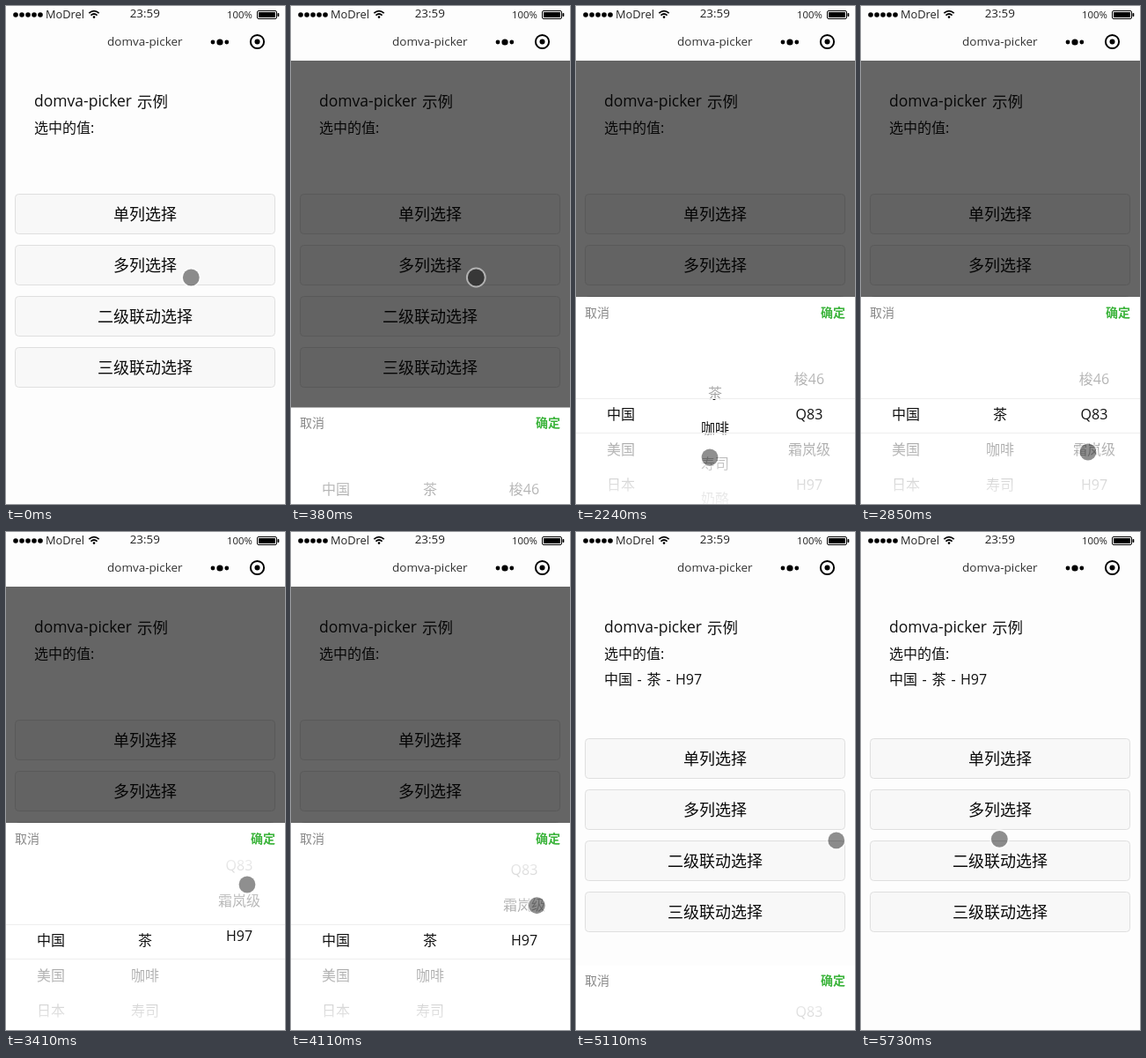
Recreate the animation shown at these times as an HTML page. Size 317 px wide and 565 px high, loop 5.8 s.

```html
<!DOCTYPE html>
<html lang="zh-CN">
<head>
<meta charset="utf-8">
<title>Picker</title>
<style>
  html, body { margin: 0; width: 100%; height: 100%; overflow: hidden; background: #fdfdfd; }
  svg { display: block; width: 317px; height: 565px; }
  text { font: 16px "Open Sans", "Noto Sans CJK SC", "Noto Sans CJK", sans-serif; }
  .mid { text-anchor: middle; }
  .end { text-anchor: end; }
</style>
</head>
<body>
<svg viewBox="0 0 317 565">
  <defs>
    <linearGradient id="fadeTop" x2="0" y2="1">
      <stop stop-color="#fff" stop-opacity=".95"/>
      <stop offset="1" stop-color="#fff" stop-opacity=".6"/>
    </linearGradient>
    <linearGradient id="fadeBottom" x2="0" y2="1">
      <stop stop-color="#fff" stop-opacity=".6"/>
      <stop offset="1" stop-color="#fff" stop-opacity=".95"/>
    </linearGradient>
    <clipPath id="wheel"><rect y="365" width="317" height="200"/></clipPath>
  </defs>

  <rect width="317" height="565" fill="#fdfdfd"/>

  <!-- Status bar -->
  <g id="signal"></g>
  <g fill="#222">
    <text x="45" y="13.5" style="font-size:12.8px">MoDrel</text>
    <text class="mid" x="157.8" y="13.3" style="font-size:13.4px">23:59</text>
    <text class="end" x="280" y="14" style="font-size:11.4px">100%</text>
  </g>
  <g fill="none" stroke="#000" stroke-width="1.7">
    <path d="M94.3 8.2Q100 3.2 105.7 8.2M96.4 10.6Q100 7.4 103.6 10.6"/>
    <circle cx="100" cy="12.6" r="1.3" fill="#000" stroke="none"/>
  </g>
  <rect x="285.5" y="5.5" width="22" height="9" rx="1.5" fill="none" stroke="#000"/>
  <rect x="287" y="7" width="19" height="6"/>
  <rect x="308.5" y="8" width="1.8" height="4" rx=".8"/>

  <!-- Navigation bar -->
  <text class="mid" x="157.8" y="45" fill="#333" style="font-size:13.5px">domva-picker</text>
  <circle cx="235" cy="41" r="2.4"/>
  <circle cx="243" cy="41" r="3.6"/>
  <circle cx="250.8" cy="41" r="2.4"/>
  <circle cx="285.5" cy="40.5" r="7.6" fill="none" stroke="#000" stroke-width="2"/>
  <circle cx="285.5" cy="40.5" r="3"/>

  <!-- Page -->
  <g fill="#111">
    <text x="32" y="114" style="font-size:17.5px">domva-picker</text>
    <text x="149" y="114.5" style="font-size:17.5px">示例</text>
    <text x="32" y="143.5">选中的值:</text>
    <text id="result" y="172.5"><tspan x="32">中国</tspan><tspan x="69.5">-</tspan><tspan x="80.5">茶</tspan><tspan x="102.5">-</tspan><tspan x="113">H97</tspan></text>
  </g>
  <g id="buttons" fill="#0a0a0a"></g>

  <rect id="mask" y="62" width="317" height="503" fill-opacity=".6"/>

  <!-- Picker panel -->
  <g id="panel">
    <rect y="330" width="317" height="235" fill="#fff"/>
    <text x="10" y="352.5" fill="#888" style="font-size:14px">取消</text>
    <text class="end" x="306" y="352.5" fill="#3cb43c" style="font-size:14px;font-weight:700">确定</text>
    <g id="columns" fill="#111" clip-path="url(#wheel)"></g>
    <rect y="365" width="317" height="80" fill="url(#fadeTop)"/>
    <rect y="485" width="317" height="80" fill="url(#fadeBottom)"/>
    <path d="M0 445.5H317M0 484.5H317" stroke="#eee"/>
  </g>

  <g id="pointer">
    <circle r="10.4" fill="none" stroke="#fff" stroke-opacity=".5" stroke-width="2"/>
    <circle id="touch" r="9.4"/>
  </g>
</svg>
<script>
const LOOP = 5800;
const PRESSED_AT = 230, OPEN_AT = 380, CONFIRM_AT = 4980, CLOSE_AT = 5040;
const $ = id => document.getElementById(id);

function add(parent, tag, attrs, text = '') {
  const node = document.createElementNS('http://www.w3.org/2000/svg', tag);
  for (const name in attrs) node.setAttribute(name, attrs[name]);
  node.textContent = text;
  return parent.appendChild(node);
}

for (let i = 0; i < 5; i++) add($('signal'), 'circle', { cx: 11 + i * 7, cy: 10, r: 2.8 });

const buttons = ['单列选择', '多列选择', '二级联动选择', '三级联动选择'].map((label, i) => {
  const y = 213 + i * 58;
  const box = add($('buttons'), 'rect', {
    x: 10.5, y: y + .5, width: 295, height: 45, rx: 4, fill: '#f8f8f8', stroke: '#dfdfdf'
  });
  const text = add($('buttons'), 'text', { class: 'mid', x: 158, y: y + 30.3, style: 'font-size:18px' }, label);
  return { box, text };
});

// Each wheel: centre x, rows, and keys of [time, selected row]
const wheels = [
  { x: 51, rows: ['中国', '美国', '日本', '俄罗斯'], keys: [[1170, 1], [1400, .1], [1560, 0]] },
  { x: 158, rows: ['茶', '咖啡', '寿司', '奶酪'], keys: [[2130, 1], [2240, .6], [2400, .05], [2600, 0]] },
  { x: 265, rows: ['梭46', 'Q83', '霜岚级', 'H97'], keys: [[2860, 1], [3150, 2.1], [3410, 3.12], [3640, 3]] }
];
for (const wheel of wheels) {
  wheel.node = add($('columns'), 'g', {});
  wheel.rows.forEach((row, i) =>
    add(wheel.node, 'text', { class: 'mid', x: wheel.x, y: 468.5 + i * 40 }, row));
}

// Pointer keys: [time, x, y]
const path = [
  [380, 210.3, 308], [930, 55.5, 464.5], [1160, 55.5, 464.5], [1500, 46, 509], [1620, 46, 509],
  [2020, 162, 464], [2120, 160, 466], [2240, 152, 512], [2400, 152, 516], [2710, 256, 508],
  [2860, 258, 506], [3410, 274, 400], [3500, 275, 404], [3760, 285, 545], [3960, 262, 493],
  [4030, 262, 493], [4190, 296, 357], [4480, 296, 357], [4570, 296, 350], [5100, 296, 350],
  [5560, 154, 319], [5730, 157.3, 348.3]
];

function follow(keys, t) {
  const next = keys.findIndex(key => key[0] > t);
  if (next === 0) return keys[0].slice(1);
  if (next < 0) return keys[keys.length - 1].slice(1);
  const a = keys[next - 1], b = keys[next];
  const p = (t - a[0]) / (b[0] - a[0]);
  const eased = p * p * (3 - 2 * p);
  return a.slice(1).map((v, i) => v + (b[i + 1] - v) * eased);
}

// CSS "ease": cubic-bezier(.25, .1, .25, 1)
function ease(p) {
  if (p <= 0) return 0;
  if (p >= 1) return 1;
  const bezier = (s, a, b) => 3 * s * (1 - s) ** 2 * a + 3 * s * s * (1 - s) * b + s ** 3;
  let lo = 0, hi = 1;
  for (let i = 0; i < 20; i++) {
    const s = (lo + hi) / 2;
    if (bezier(s, .25, .25) < p) lo = s; else hi = s;
  }
  return bezier(lo, .1, 1);
}

const show = (id, on) => $(id).setAttribute('visibility', on ? 'visible' : 'hidden');
const move = (node, x, y) => node.setAttribute('transform', `translate(${x} ${y})`);
const within = (t, from, to) => t >= from && t < to;

function draw(t) {
  const confirmed = t >= CONFIRM_AT;
  show('result', confirmed);
  move($('buttons'), 0, confirmed ? 21 : 0);

  const active = within(t, PRESSED_AT, OPEN_AT);
  buttons[1].box.setAttribute('fill', active ? '#dedede' : '#f8f8f8');
  buttons[1].text.setAttribute('fill-opacity', active ? .6 : 1);

  show('mask', within(t, OPEN_AT, CLOSE_AT));
  show('panel', t >= OPEN_AT);
  const raised = ease((t - 298) / 300) - ease((t - 4990) / 300);
  move($('panel'), 0, 235 * (1 - raised));
  for (const wheel of wheels) move(wheel.node, 0, -40 * follow(wheel.keys, t)[0]);

  const [x, y] = follow(path, t);
  move($('pointer'), x, y);
  const pressed = within(t, 80, 300) || within(t, 1010, 1230) || within(t, 4570, 5040);
  $('touch').setAttribute('fill-opacity', pressed ? .52 : .44);
}

function tick() {
  draw(performance.now() % LOOP);
  requestAnimationFrame(tick);
}
tick();
</script>
</body>
</html>
```
